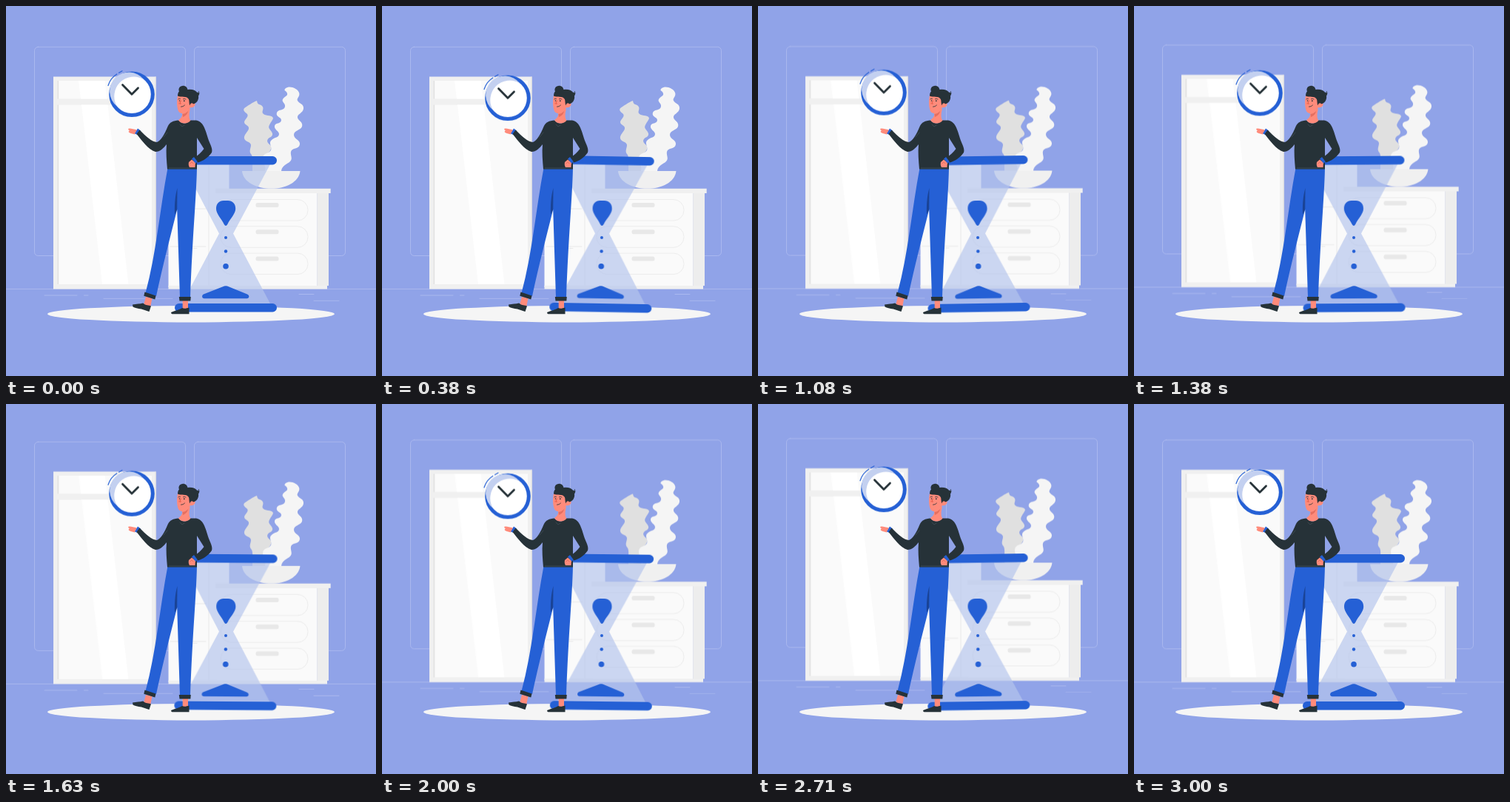
Animation of 500 by 500 pixels, one loop 3.04 s. Source, as an HTML page without scripts:

```html
<!DOCTYPE html>
<html lang="en">
<head>
<meta charset="utf-8">
<title>Time waits</title>
<style>
  html, body { margin: 0; width: 100%; height: 100%; overflow: hidden; background: #90a3e8; }
  svg { display: block; width: 100%; height: 100%; }
  .blue { fill: #2560d5; }
  .dark { fill: #263238; }
  .skin { fill: #ff8b7b; }
  .pale { fill: #fafafa; }
  .trim { fill: #f0f0f0; }
  .line { fill: none; stroke-linecap: round; stroke-linejoin: round; }
  .room, .clock, .glass { animation: 3.04s linear infinite; }
  .room { animation-name: rise; }
  .clock { animation-name: bob; }
  .glass { animation-name: rock; transform-origin: 297px 308.5px; }

  @keyframes rise {
    0%, 32.895% { transform: translateY(0); }
    82.237% { transform: translateY(-10px); }
    100% { transform: translateY(-6.4px); }
  }
  @keyframes bob {
    0% { transform: translateY(0); }
    14.803%, 64.145% { transform: translateY(6px); }
    39.474%, 88.816% { transform: translateY(-4px); }
    100% { transform: translateY(.53px); }
  }
  @keyframes rock {
    0% { transform: rotate(0deg); }
    12.336%, 61.678% { transform: rotate(1deg); }
    37.007%, 86.349% { transform: rotate(-1deg); }
    98.684% { transform: rotate(0deg); }
    100% { transform: rotate(.107deg); }
  }
</style>
</head>
<body>
<svg viewBox="0 0 500 500">
  <defs>
    <g id="drawer">
      <rect x="290" y="261.5" width="118" height="28.5" rx="14" fill="none" stroke="#ededed"/>
      <rect x="337.5" y="266" width="31" height="6" rx="2.5" fill="#e8e8e8"/>
    </g>
  </defs>

  <g class="room">
    <g class="line" stroke="#b1bef0" stroke-width=".8">
      <rect x="38.5" y="55.3" width="204" height="282.2" rx="5"/>
      <rect x="254.5" y="55.3" width="204" height="282.2" rx="5"/>
      <path d="M0 382.4H500M52 391H96M105.500 391H111M132 395.300H225M396 389.500H416M416 398.300H450"/>
    </g>

    <!-- wardrobe -->
    <path class="trim" d="M64 95.500H202.500V382.400H64z"/>
    <path class="pale" d="M70 101H197V125.500H70zM70 133.500H197V376H70z"/>
    <path fill="#fff" d="M98 101H133.500L136.500 125.500H101zM102 133.500H137.500L165.500 376H130z"/>
    <path fill="#e2e2e2" d="M69.500 101h1.700v24.500h-1.700zM69.500 133.500h1.700V376h-1.700zM201.500 95.500h1.300V382h-1.300z"/>

    <!-- sideboard -->
    <path class="pale" d="M219.500 214H301.500V380H219.500z"/>
    <path class="line" stroke="#e9e9e9" d="M274 216V378M222 274H270M222 325H270M253 327.500H258"/>
    <path class="trim" d="M219.500 377.700H434V382.400H219.500z"/>
    <path class="pale" d="M284 252H421V378H284z"/>
    <path fill="#ededed" d="M421 252H436V378H421z"/>
    <path fill="#dcdfea" d="M420.200 247H421V378H420.200z"/>
    <path class="trim" d="M283 246.800H438.700V253H283z"/>
    <use href="#drawer"/>
    <use href="#drawer" y="36.300"/>
    <use href="#drawer" y="72.600"/>

    <!-- plants -->
    <path fill="#e0e0e0" d="M339 128C332 131 328 134 325 136C319 139 321 142 325 145C330 149 322 153 322 157C322 161 329 161 328 166C327 170 321 174 322 179C323 184 331 183 331 188C331 192 328 196 331 200C334 203 333 208 333 223H354C354 210 349 204 354 199C359 194 360 190 356 187C351 183 353 179 358 177C363 173 358 169 356 166C353 162 359 157 361 152C361 147 352 149 348 146C344 143 350 139 346 135C344 132 340 135 339 128z"/>
    <path fill="#f5f5f5" d="M378 111C383 107 394 111 396 117C398 122 392 125 394 128C396 132 403 132 402 139C401 145 393 146 394 151C395 155 402 157 400 163C398 168 389 168 389 174C389 180 398 181 397 187C396 194 386 191 385 197C384 202 388 206 384 210C380 214 373 215 372 223H350C352 215 346 211 347 205C348 198 355 200 358 195C360 190 354 185 359 181C363 177 369 178 369 173C369 169 362 167 363 162C364 157 372 160 372 154C372 150 364 150 366 144C368 139 376 142 377 136C378 131 372 130 374 126C376 122 381 122 380 118C379 114 374 115 378 111z"/>
    <path class="trim" d="M319 223H397.500C396 238 378 246.800 358.500 246.800S320 238 319 223z"/>
  </g>

  <ellipse cx="250" cy="416.200" rx="194" ry="11.200" fill="#f5f5f5"/>

  <g class="clock">
    <circle cx="170" cy="119.200" r="28.300" fill="#fff" stroke="#2560d5" stroke-width="5"/>
    <path fill="#c3d0f0" d="M186 99A25.800 25.800 0 1 0 150 135.500A26.500 26.500 0 0 1 186 99z"/>
    <path class="line" stroke="#263238" stroke-width="2.800" d="M157.500 106.500L170 119.200L178.500 110.700"/>
    <path class="line" stroke="#2560d5" stroke-width="1.200" d="M138 107.500C140 101 144 95.500 149.800 92M152.500 90.200L157 87.800"/>
  </g>

  <g class="glass">
    <path fill="#b4c5ec" fill-opacity=".68" d="M238 212H358L307 307.500L358 404H237L288 307.500z"/>
    <rect class="blue" x="228" y="203" width="138" height="11.500" rx="5.700"/>
    <rect class="blue" x="228" y="402" width="138" height="11.500" rx="5.700"/>
    <g class="blue">
      <path d="M284 274C284 267 288 263 294 263H300C306 263 310.200 267 310.200 274C310.200 281 303 287 299.300 295Q297 298.800 294.700 295C291 287 284 281 284 274z"/>
      <circle cx="297" cy="313" r="2"/>
      <circle cx="297" cy="331.500" r="2.200"/>
      <circle cx="297" cy="351.800" r="3.800"/>
      <path d="M267 389.600L295 378.500Q297 377.800 299 378.500L326 389.400C329.500 391 328.800 395.200 325.500 395.200H268C264.300 395.200 264.300 390.800 267 389.600z"/>
    </g>
  </g>

  <g>
    <!-- legs -->
    <path class="skin" d="M189 393L197.500 395L195 407L186 404zM238.700 397H246V410H238.700z"/>
    <path class="dark" d="M171 403.500C176 402.500 181 402.800 185 401.500C189 405 193 404 196 405.500L193.500 413L183 409.500C178 408.800 174 408 171.500 406.500zM223 414C228 411.500 234 411 238 408C241 409.500 244 408.500 247.500 407.500V416.300H224.500Q223 416 223 414z"/>
    <path class="blue" d="M218.500 219H258C257 262 252 310 249 394H235L231.200 275C222 312 212 350 203 392L188.500 388C203 335 208 274 218.500 219z"/>
    <path fill="#1a4396" d="M231.500 246C228.500 257 227.500 268 228 282L231.200 275z"/>
    <path class="dark" d="M187.500 386.500L202.500 391.500L201.300 396.500L186.300 391.700zM233.800 393H249.800L249.300 398.500H234.500z"/>

    <!-- hands -->
    <path class="skin" d="M177 167.500C172 166.500 168 164.800 165.500 165.800C164.500 167 166 168 167 168.300C164.500 169.500 166 171.500 168.500 172L174 173.500z"/>
    <path class="blue" d="M178 165.500L182 168.500L177.500 174L174 172.500z"/>

    <!-- sweater -->
    <path class="dark" d="M233 154.500C226 155 221 157 218.500 163C214 174 209 182 204 184C197 184 188 175 180.500 167.500L176.500 173C184 182 192 194 202 197C208 197 213 192 217 187C216 198 217 209 218 220.500H258V178L267.500 193C264 198 259 202 255 205L259 211.500C266 210 274 204 278 198C279.500 194 277 189 274.500 183C270 171 268 156 257 154.500H249C244 160 238 159.500 233 154.500z"/>
    <path class="line" stroke="#46545b" stroke-width=".7" d="M235 160L238 163L241 161M213 177L218 171M220 219H256"/>
    <path class="skin" d="M247 211L251 207.500L256 211.500L255.500 218H248C246.500 216 246.500 213 247 211z"/>
    <path class="blue" d="M251 206.500L254 204L258.500 210L256.500 213z"/>
    <path class="line" stroke="#d9604f" stroke-width=".6" d="M249 213L251 211L253 213"/>

    <!-- head -->
    <path class="skin" d="M238 144C239 149 236 152 233 154C236 160 246 160 249.500 154.500C247 152 247 146 249 139z"/>
    <path fill="#e56f60" d="M238.500 146C242 146 245 143 246.500 140C246 146 242 149 239 150z"/>
    <path class="skin" d="M232 121C230.500 128 230.800 137 233 142C235 146 241 146 245 143C247 141.500 248 139 249 137C253 138 256 135 255.500 132C255 129.500 252 130 250 131L249 121z"/>
    <path class="dark" d="M232 121.500C232 118 233 116.500 234 115.500C232 111 236 107 241 108C244 108.500 245 111 245.500 113C250 112 256 113 258.500 117C260 118 261 117 261.200 116C261.800 119 260.500 120.500 260 121.500C261 127 257 132 253 132.500C252 130.500 249 131 248.500 134.500C247 131 248 127 246.500 125.500C244 121 237 124 232 121.500z"/>
    <g class="line" stroke="#263238" stroke-width=".8">
      <path d="M232.800 125.800Q234 124.500 235.500 125.300M239.500 125.600Q241.500 124.500 243 126M259 118L260.500 115.500"/>
      <path stroke="#d9533f" d="M236.300 128L235 132H236.500"/>
      <path d="M236.500 136.200Q239.500 136.500 241.500 134"/>
    </g>
    <g class="dark">
      <circle cx="234.500" cy="128" r=".8"/>
      <circle cx="240.800" cy="128.200" r=".9"/>
    </g>
    <circle cx="234.500" cy="131.500" r="1.500" fill="#f26a58" opacity=".6"/>
  </g>
</svg>
</body>
</html>
```
